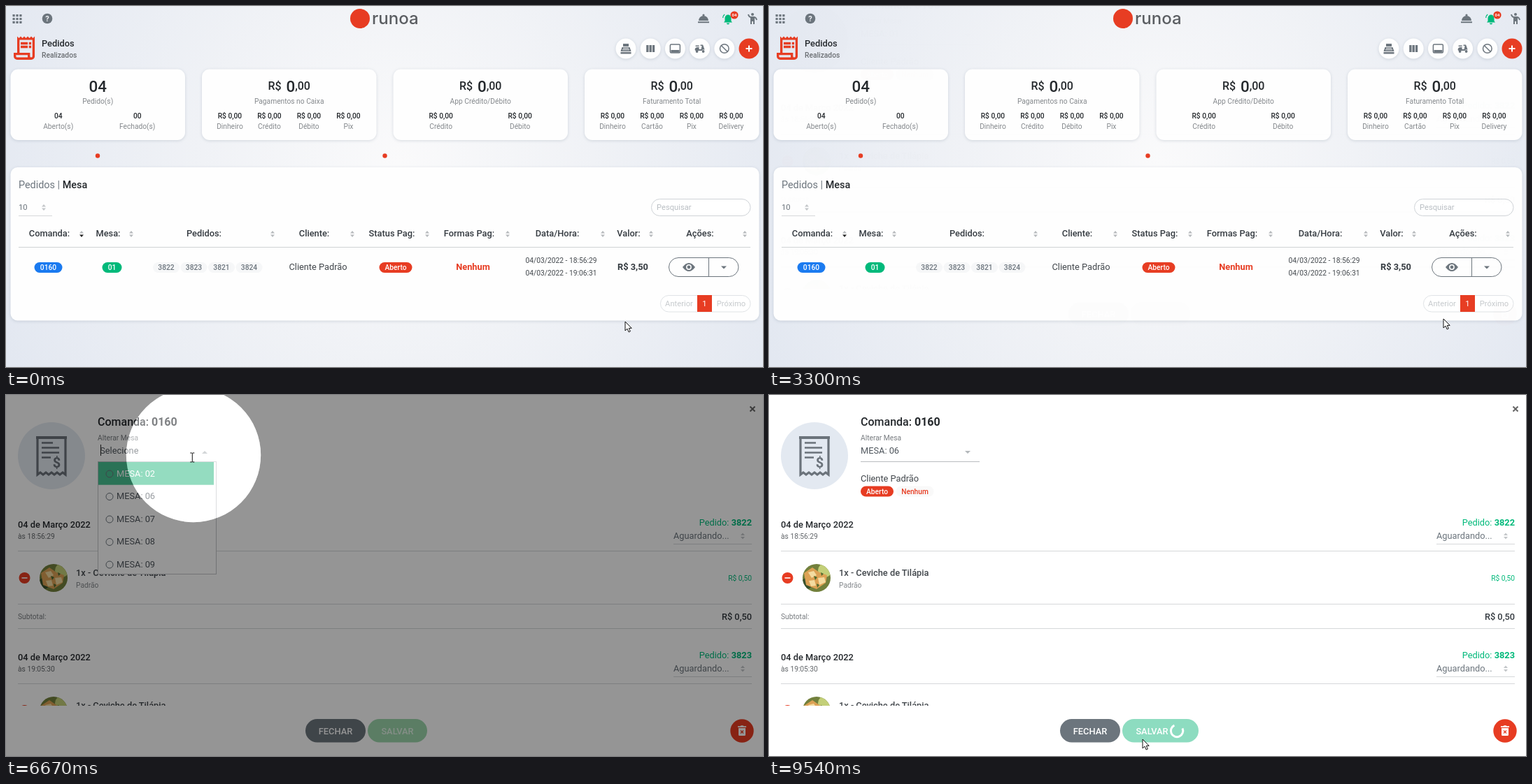
Animation, 1082 px wide and 517 px high, one loop 9.59 s. Source, as an HTML page:

```html
<!DOCTYPE html>
<html lang="pt-BR">
<head>
<meta charset="utf-8">
<title>Pedidos</title>
<style>
html, body { margin: 0; width: 100%; height: 100%; overflow: hidden; background: #fff; }
svg { position: absolute; left: 0; top: 0; display: block; overflow: hidden; }
text { font-family: Roboto, sans-serif; white-space: pre; }
.card { fill: #fefefe; filter: drop-shadow(0 1px 2px rgba(40, 60, 90, .16)); }
</style>
</head>
<body>
<svg id="stage" width="1082" height="517"></svg>
<script>
const RED = '#e73c22', GREEN = '#00b97a', GRAY = '#6c757d', INK = '#24282c', BODY = '#50575e', MUTED = '#84888c';
const S = 10.24, M = 12.8;

// Drawing helpers; text is placed by the vertical centre of its capitals.
const T = (x, y, s, size = M, fill = INK, weight = 400, anchor = 'middle', more = '') =>
  `<text x="${x}" y="${Math.round(y + size * .356)}" font-size="${size}" fill="${fill}" font-weight="${weight}" text-anchor="${anchor}" ${more}>${s}</text>`;
const L = (x, y, s, size, fill, weight) => T(x, y, s, size, fill, weight, 'start');
const R = (x, y, s, size, fill, weight) => T(x, y, s, size, fill, weight, 'end');
const box = (x, y, w, h, r, fill, more = '') =>
  `<rect x="${x}" y="${y}" width="${w}" height="${h}" rx="${r}" fill="${fill}" ${more}/>`;
const dot = (x, y, r, fill, more = '') => `<circle cx="${x}" cy="${y}" r="${r}" fill="${fill}" ${more}/>`;
const path = (d, fill = GRAY, more = '') => `<path d="${d}" fill="${fill}" ${more}/>`;
const stroke = (d, color, w = 1, more = '') => path(d, 'none', `stroke="${color}" stroke-width="${w}" ${more}`);
const at = (x, y, s, k = 1) => `<g transform="translate(${x} ${y}) scale(${k})">${s}</g>`;
const rule = (x1, x2, y, color = '#d6d8da') => stroke(`M${x1} ${y}H${x2}`, color);
const sorter = (x, y, up = '#c3c6c9', down = up) =>
  path(`M${x - 3} ${y - 1}l3-3.5 3 3.5z`, up) + path(`M${x - 3} ${y + 1}l3 3.5 3-3.5z`, down);
const pill = (x, y, w, s, fill, color = '#fff', weight = 500) =>
  box(x - w / 2, y - 7.5, w, 15, 7.5, fill) + T(x, y, s, S, color, weight);

const register = path('M-4-7h8v4h-8zM-5.5-2h11l2 6h-15zM-7.5 5h15v2.5h-15z') +
  stroke('M-4-.3h8M-5 1.8h10', '#fff', .9);
const plus = w => stroke('M-4.5 0h9M0-4.5v9', '#fff', w);
const pencil = path('M-7 4v3h3l8-8-3-3zM2-5l3 3 2-2-3-3z');
const receipt = path('M15 0L13.5 1.5 12 0 10.5 1.5 9 0 7.5 1.5 6 0 4.5 1.5 3 0V14H0V17A3 3 0 0 0 3 20H15A3 3 0 0 0 18 17V0L16.5 1.5Z' +
  'M12 18H3A1 1 0 0 1 2 17V16H12ZM16 17A1 1 0 0 1 14 17V14H5V3H16Z', RED, 'fill-rule="evenodd"') +
  path('M6 5h6v2H6zM13 5h2v2h-2zM6 8h6v2H6zM13 8h2v2h-2z', RED);

function header() {
  let s = '';
  for (let i = 0; i < 9; i++) s += box(9.5 + i % 3 * 4.9, 12 + Math.floor(i / 3) * 4.9, 3.2, 3.2, .4, GRAY);
  s += dot(59, 18, 7.3, GRAY) + T(59, 18.2, '?', 11, '#eef1f5', 700);
  s += dot(506, 18, 14, RED);
  s += `<text x="523" y="26" font-size="24" fill="#5a5d61" font-weight="500" style="font-family:Inter,sans-serif">runoa</text>`;
  s += at(997, 18, path('M-7 3a7 7 0 0 1 14 0zM-8 4.3h16v2h-16z') + dot(0, -5, 1.6, GRAY));
  s += at(1032, 19, path('M-6 4.5l1.5-2v-4a4.5 5 0 0 1 9 0v4l1.5 2zM-2 5.5h4a2 2 0 0 1-4 0z', GREEN) +
    stroke('M-7.3-2q0-3 2.5-5M7.3-2q0-3-2.5-5', GREEN, 1.3));
  s += dot(1041, 13, 5.6, RED) + T(1041, 13, '04', 6, '#fff', 700);
  s += at(1067, 18, dot(0, -6, 2, GRAY) + stroke('M-6-6q1 4 4 4h4q3 0 4 4M-2-2v10M2-2v10M0-2v6', GRAY, 2));
  s += at(11, 43.5, receipt, 1.67);
  s += L(51, 53, 'Pedidos', M, INK, 500) + L(51, 70, 'Realizados', S, '#6a6e72', 500);
  const icons = [
    register,
    path('M-6-5h3.3v10h-3.3zM-1.7-5h3.4v10h-3.4zM2.7-5h3.3v10h-3.3z'),
    box(-7, -6, 14, 12, 1.5, 'none', `stroke="${GRAY}" stroke-width="1.5"`) + box(-6, 2, 12, 3.5, 0, GRAY),
    path('M-7 2q0-4 4-4h2v3h3l1-5h-2v-1.5h3.5l2.5 7h-3l-1 1.5h-9zM-6-4.5h5v1.5h-5z') + dot(-4, 4, 1.9, GRAY) + dot(5, 4, 1.9, GRAY),
    dot(0, 0, 6.3, 'none', `stroke="${GRAY}" stroke-width="1.5"`) + stroke('M-4.5-4.5l9 9', GRAY, 1.5)
  ];
  icons.forEach((icon, i) => {
    const x = 886 + i * 35.2;
    s += dot(x, 61, 14.5, '#fefefe', 'class="card"') + at(x, 61, icon);
  });
  return s + dot(1062, 61, 14.5, RED) + at(1062, 61, plus(2));
}

function cards() {
  const cash = 'R$ 0,00';
  const money = `R$ <tspan font-size="22.4" dx="3" dy="3">0</tspan><tspan dy="-3">,00</tspan>`;
  const list = [
    ['04', 'Pedido(s)', [['04', 'Aberto(s)'], ['00', 'Fechado(s)']]],
    [money, 'Pagamentos no Caixa', ['Dinheiro', 'Crédito', 'Débito', 'Pix'].map(n => [cash, n])],
    [money, 'App Crédito/Débito', ['Crédito', 'Débito'].map(n => [cash, n])],
    [money, 'Faturamento Total', ['Dinheiro', 'Cartão', 'Pix', 'Delivery'].map(n => [cash, n])]
  ];
  return list.map(([big, label, parts], i) => {
    const x = 6.5 + i * 273.5, c = x + 124.7, step = 226 / parts.length;
    return box(x, 90.5, 249.5, 101.5, 11, '', 'class="card"') +
      T(c, i ? 114 : 115, big, i ? 16 : 22.4, INK, 500) + T(c, 136.5, label, S, MUTED) +
      parts.map(([v, n], j) => {
        const px = c + (j - (parts.length - 1) / 2) * step;
        return T(px, 157.5, v, S, INK, 500) + T(px, 172.5, n, S, MUTED);
      }).join('');
  }).join('');
}

function table() {
  const columns = [['Comanda:', 62, 108], ['Mesa:', 146, 179], ['Pedidos:', 283, 381], ['Cliente:', 440.5, 495],
    ['Status Pag:', 551.5, 602], ['Formas Pag:', 662, 717], ['Data/Hora:', 788, 853], ['Valor:', 890, 922], ['Ações:', 992, 1056]];
  let s = box(6.5, 231, 1070, 219.5, 10, '', 'class="card"') +
    L(18, 256, 'Pedidos | <tspan fill="#24282c" font-weight="500">Mesa</tspan>', 14.4, GRAY) +
    L(18, 288, '10', 11.2, GRAY) + sorter(54, 288.5) + rule(18, 66, 300.5) +
    box(922.5, 276.5, 141.5, 24, 12, '#fff', 'stroke="#cfd3d7"') + L(930, 288.5, 'Pesquisar', 11.2, '#b9bec3');
  columns.forEach(([name, x, sx], i) => {
    s += T(x, 325.5, name, M, '#343a40', 500) + sorter(sx, 326.5, '#b7babd', i ? '#b7babd' : '#222');
  });
  s += rule(18, 1064, 345.5, '#cfd2d4');
  s += pill(60.5, 374.5, 40, '0160', '#1a7af0') + pill(151.5, 374.5, 28, '01', GREEN);
  [3822, 3823, 3821, 3824].forEach((n, i) => s += pill(229 + i * 39.5, 374.5, 38, n, '#f6f7f8', GRAY));
  s += T(446, 373.5, 'Cliente Padrão', M, '#42474c') + pill(557, 374.5, 47, 'Aberto', RED) +
    T(667.5, 373.5, 'Nenhum', M, RED, 700) +
    T(793.5, 364, '04/03/2022 - 18:56:29', S, '#42474c') + T(793.5, 382.5, '04/03/2022 - 19:06:31', S, '#42474c') +
    T(896, 373.5, 'R$ 3,50', M, '#343a40', 700);
  s += box(947.5, 360.5, 99.5, 27, 13.5, '#fefefe', `stroke="${GRAY}"`) + stroke('M1004.5 360v28', GRAY);
  s += path('M967 374q9-12 18 0q-9 12-18 0z') + dot(976, 374, 3.9, '#fff') + dot(976, 374, 2.4, GRAY);
  s += `<g id="pressed">${path('M1004 360h29a14 14 0 0 1 0 28h-29z', GRAY, 'stroke="#c4c8cb" stroke-width="3" paint-order="stroke"')}</g>`;
  s += path('M1022 372.5h8l-4 4z', GRAY, 'id="caret"');
  s += box(935.5, 414.5, 128.5, 23.5, 11.7, '#fff', 'stroke="#e0e3e6"') + box(988, 414, 21, 24, 0, RED) +
    T(962, 426, 'Anterior', 11.2, '#c6cacd') + T(998.5, 426, '1', 11.2, '#fff') + T(1036.5, 426, 'Próximo', 11.2, '#c6cacd');
  return s;
}

function actionMenu() {
  return box(888.5, 392.5, 158.5, 118, 7, '#fff', 'stroke="#cdd0d3"') + rule(889, 1047, 431.5) + rule(889, 1047, 471.5) +
    dot(918, 412, 7.5, RED) + at(918, 412, plus(1.8)) + at(918, 451, pencil) + at(918, 490, register) +
    ['Adicionar Pedido', 'Editar Comanda', 'Fechar Comanda'].map((n, i) => L(930, 411 + i * 39.2, n, M, '#7d8489')).join('');
}

const dish = at(68, 262, dot(0, 0, 20, '#72803c') +
  '<g clip-path="url(#plate)">' + dot(12, -11, 10, '#c3cf78') + dot(-14, 8, 8, '#39502c') +
  path('M-18-7l12-8 10 7 11 4-2 11-13 9-15-6z', '#dca154') +
  path('M-12-8l8-2 4 6-7 4zM2 0l9-1 2 7-9 4zM-11 4l8-1 2 8-7 1z', '#f3dba0') +
  path('M-4-3l5 2-3 4zM6-8l4 2-3 3zM0 8l4 2-3 4z', '#4c6a2f') + '</g>');

function order(number, time) {
  return L(17, 185.5, '04 de Março 2022', M, INK, 500) + L(17, 202.5, time, S, '#62666a') +
    R(1066, 182.5, `Pedido: <tspan font-weight="700">${number}</tspan>`, M, GREEN) +
    L(954, 201.5, 'Aguardando...', M, GRAY) + sorter(1053, 202) + rule(954, 1066, 213.5) + rule(17, 1066, 223.5) +
    dot(26.5, 262, 8, RED) + stroke('M22.5 262h8', '#fff', 1.6) + dish +
    L(100, 254.5, '1x - Ceviche de Tilápia', M, '#42474c', 500) + L(100, 272.5, 'Padrão', S, MUTED) +
    R(1066, 262.5, 'R$ 0,50', S, GREEN);
}

function modal() {
  const zigzag = 'M45 61h40v53l-4-3-4 3-4-3-4 3-4-3-4 3-4-3-4 3-4-3-4 3z';
  return box(0, 0, 1082, 517, 0, '#fff') + dot(65, 87, 48, '#e3e9f1') + stroke(zigzag, '#6b737b', 3.2) +
    stroke('M43 61h44', '#6b737b', 4) + stroke('M51 68.5h16M51 75.5h25M51 82.5h25M51 89.5h13', '#6b737b', 2.4) +
    T(72.5, 97, '$', 20, '#6b737b', 700) +
    L(131, 38, 'Comanda: <tspan font-weight="700">0160</tspan>', 16, INK, 500) +
    L(131, 61.5, 'Alterar Mesa', S, '#777b7f') + L(131, 79, '<tspan id="chosen"></tspan>', M, BODY) +
    path('M280 80h8l-4 4z', '#b4b8bb', 'id="selectArrow"') + rule(131, 301, 95.5, '#b9bcbf') +
    L(131, 119, 'Cliente Padrão', M, '#42474c') + pill(154.5, 138, 47, 'Aberto', RED) + pill(208.5, 138, 54, 'Nenhum', '#f9f9f9', RED) +
    stroke('M1063.5 16.5l7 7M1070.5 16.5l-7 7', '#666', 2) +
    order(3822, 'às 18:56:29') + rule(17, 1066, 299.5) + L(17, 317.5, 'Subtotal:', S, '#777b7f') +
    R(1066, 317.5, 'R$ 0,50', M, '#343a40', 500) + rule(17, 1066, 334.5) +
    `<g clip-path="url(#scroll)"><g transform="translate(0 190)">${order(3823, 'às 19:05:30')}</g></g>` +
    `<g id="close">${box(428, 464, 86, 33.5, 16.7, GRAY)}${T(471, 481, 'FECHAR', M, '#fff', 500)}</g>` +
    `<g id="save">${box(517, 464, 85, 33.5, 16.7, GREEN, 'id="saveFill"')}${T(559.5, 481, 'SALVAR', M, '#fff', 500, 'middle', 'id="saveText"')}` +
    stroke('M6.2-6.2A8.7 8.7 0 1 0 6.2 6.2', '#fff', 3, 'id="spinner"') + '</g>' +
    dot(1052, 481, 16.7, RED) + path('M1047 477h10v9.5q0 1.5-1.5 1.5h-7q-1.5 0-1.5-1.5zM1046 474.3h3.5l1-1h3l1 1h3.5v1.7h-12z', '#fff') +
    stroke('M1050 480.5l4 4M1054 480.5l-4 4', RED, 1.3);
}

function tableList() {
  const items = ['02', '06', '07', '08', '09'].map((n, i) => {
    const y = 112 + i * 32.5;
    return dot(148, y + 1, 5, 'none', `stroke="${GRAY}"`) + L(158, y, 'MESA: ' + n, M, BODY).replace('<text', '<text class="item"');
  }).join('');
  return stroke('M135.5 71v16', '#222') + box(131.5, 95.5, 169, 161, 0, '#fff', 'stroke="#c2c5c8"') +
    box(132, 96, 165, 32.7, 0, '#48c292', 'id="hover"') + items;
}

const edge = 'stroke="#111" stroke-width="1" stroke-linejoin="round"';
const cursor = `<g id="cursor">
  <g id="arrow">${path('M0 0V13L3 10.2 5.2 15 7.3 14 5.3 9.4H9.2Z', '#fff', edge)}</g>
  <g id="hand">${path('M-2 9V1Q-2-.5-.5-.5T1 1V6Q2 4.5 4 6 5.5 5 6.5 6.5 8.5 6 8.5 8V12Q8 14 7 16.5H-1Q-2 13.5-5 10-5.5 8-4 7.8-3 8-2 9Z', '#fff', edge)}${stroke('M4 6v3M6.5 6.5v3', '#111', .8)}</g>
  <g id="beam">${stroke('M-3-6.5h2.5l.5.5.5-.5H3M0-6V6M-3 6.5h2.5l.5-.5.5.5H3', '#111')}</g></g>`;

const $ = id => document.getElementById(id);
$('stage').innerHTML = `<defs>
  <radialGradient id="sky" gradientUnits="userSpaceOnUse" cx="560" cy="225" r="620"><stop offset="0" stop-color="#fafafb"/>
  <stop offset=".45" stop-color="#f0f2f6"/><stop offset="1" stop-color="#e3e8f1"/></radialGradient>
  <clipPath id="plate"><circle r="20"/></clipPath><clipPath id="scroll"><path d="M0 0h1082v445H0z"/></clipPath></defs>
  ${box(0, 0, 1082, 517, 0, 'url(#sky)')}${header()}${cards()}${dot(131, 214.5, 3.2, RED)}${dot(541.5, 214.5, 3.2, RED)}
  ${table()}<g id="menu">${actionMenu()}</g><g id="modal">${modal()}</g><g id="list">${tableList()}</g>
  <g id="spot">${path('', '#000', 'id="shade" fill-rule="evenodd"')}${path('', '#fff', 'id="glow"')}</g>${cursor}`;

// Each cursor trip brings a spotlight that closes in and opens again.
const LOOP = 9590, TRIP = 945, ZOOM = 280, WIDE = 350, TIGHT = 45;
const starts = [730, 2290, 4222, 6438, 8125];
const stops = [[885, 452], [1022, 384], [964, 448], [268, 86], [241, 141], [534, 493]];
const clamp = v => Math.max(0, Math.min(1, v));
const smooth = v => v * v * (3 - 2 * v);
const within = (v, a, b) => v > a && v < b;
const show = (id, on) => $(id).style.display = on ? '' : 'none';

function position(t) {
  return starts.reduce(([x, y], start, i) => {
    const p = smooth(clamp((t - start - 150) / 540)), [nx, ny] = stops[i + 1];
    return [x + (nx - x) * p, y + (ny - y) * p];
  }, stops[0]);
}

function spotlight(t) {
  const start = starts.findLast(s => t >= s && t < s + TRIP);
  const k = start === undefined ? 0 : clamp(Math.min(t - start, start + TRIP - t) / ZOOM);
  const r = WIDE - (WIDE - TIGHT) * k, [x, y] = position(t - 110);
  const disc = `M${x - r} ${y}a${r} ${r} 0 1 1 ${2 * r} 0a${r} ${r} 0 1 1 ${-2 * r} 0z`;
  $('shade').setAttribute('d', 'M0 0H1082V517H0z' + disc);
  $('glow').setAttribute('d', disc);
  $('shade').setAttribute('opacity', k / 2);
  $('glow').setAttribute('opacity', k / 2);
  show('spot', k > 0);
}

function render(t) {
  const [x, y] = position(t);
  const menuOpen = within(t, 1720, 3290), inModal = t >= 3290, listOpen = within(t, 5255, 7440);
  const changed = t >= 7440, saving = t >= 9110;

  const pressed = !inModal && (menuOpen || (x > 1004 && within(y, 360, 388)));
  show('pressed', pressed);
  $('caret').setAttribute('fill', pressed ? '#fff' : GRAY);
  show('menu', menuOpen);

  const entry = smooth(clamp((t - 3290) / 320));
  show('modal', inModal);
  $('modal').setAttribute('opacity', entry);
  $('modal').setAttribute('transform', `translate(0 ${-40 * (1 - entry)})`);

  show('list', listOpen);
  $('chosen').textContent = listOpen ? ' Selecione' : changed ? 'MESA: 06' : 'MESA: 01';
  $('selectArrow').setAttribute('d', listOpen ? 'M280 84h8l-4-4z' : 'M280 80h8l-4 4z');
  const row = y > 128.5 ? 1 : 0;
  $('hover').setAttribute('y', 96 + row * 32.5);
  document.querySelectorAll('.item').forEach((item, i) => item.setAttribute('fill', i === row ? '#fff' : BODY));

  const shift = `translate(${saving ? -12 : 0} 0)`;
  $('close').setAttribute('transform', shift);
  $('save').setAttribute('transform', shift);
  $('saveFill').setAttribute('width', saving ? 109 : 85);
  $('saveFill').setAttribute('fill', saving ? '#8ddcc0' : changed ? GREEN : '#9cd5ab');
  $('saveText').setAttribute('opacity', changed ? 1 : .7);
  show('spinner', saving);
  $('spinner').setAttribute('transform', `translate(595 481) rotate(${(t - 9540) / 750 * 360 - 70})`);

  const overButton = pressed && !menuOpen || menuOpen && x > 888;
  const overSave = within(x, 517, 602) && within(y, 464, 498) && !saving;
  const hand = overButton || listOpen && y > 96 || inModal && overSave;
  const beam = listOpen && !hand;
  show('hand', hand);
  show('beam', beam);
  show('arrow', !hand && !beam);
  $('cursor').setAttribute('transform', `translate(${x} ${y})`);
  spotlight(t);
}

function tick() {
  render(performance.now() % LOOP);
  requestAnimationFrame(tick);
}
tick();
</script>
</body>
</html>
```
